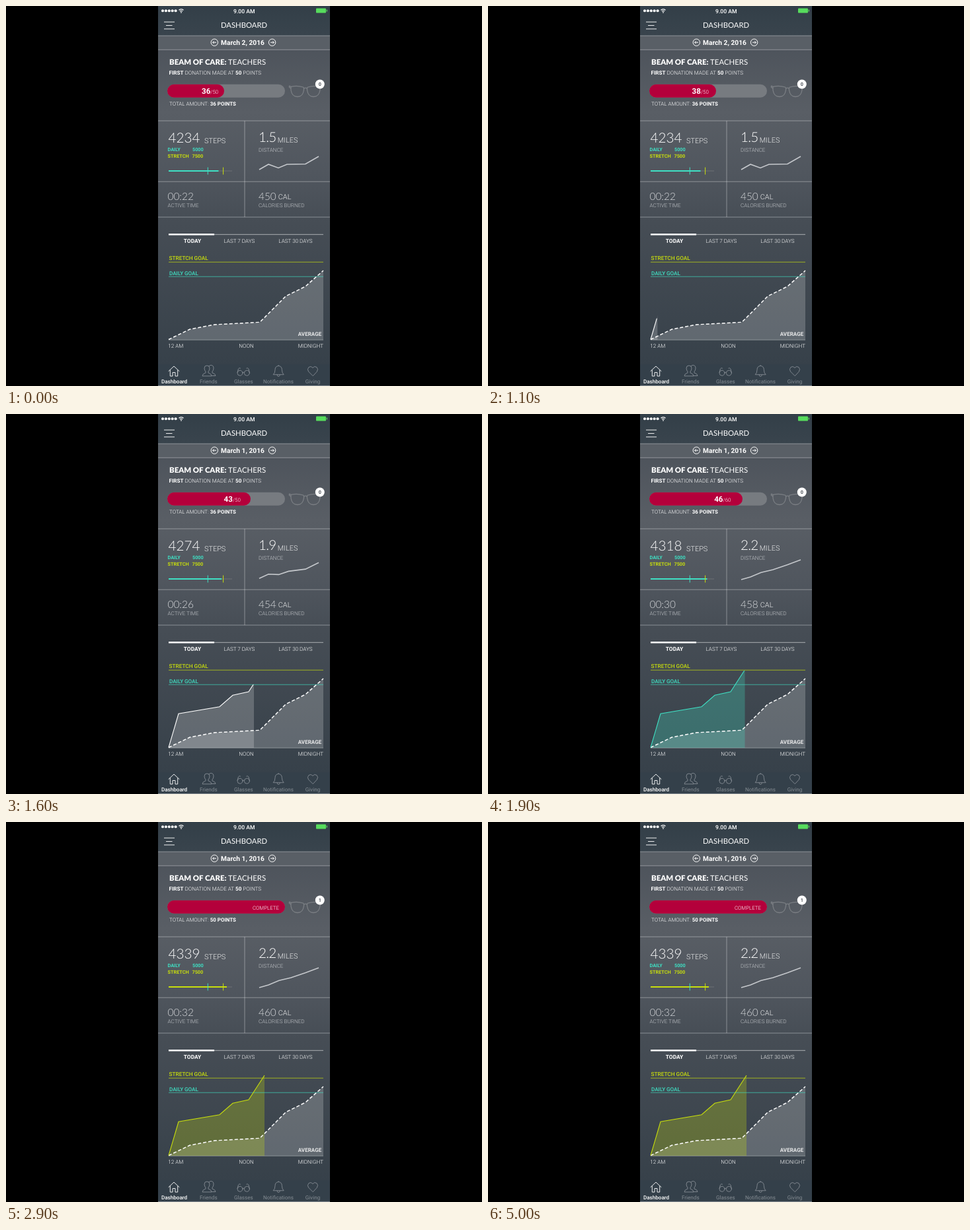
These frames come from a looping animation (720x576 px, 5.1 s). An HTML page:

```html
<!DOCTYPE html>
<html lang="en">
<head>
<meta charset="utf-8">
<title>Step dashboard</title>
<style>
  html, body { margin: 0; width: 100%; height: 100%; overflow: hidden; background: #000; }
  svg { display: block; width: 720px; height: 576px; font: 300 8.1px Roboto, sans-serif; fill: #fff; text-rendering: geometricPrecision; }
  .line { fill: none; stroke: #fff; }
  .rule { fill: none; stroke: #fff; stroke-opacity: .36; }
  .lato { font-family: Lato, sans-serif; }
  .big { font: 300 20.7px Lato, sans-serif; }
  .mid { font: 300 15.4px Lato, sans-serif; fill: #d9dbde; }
  .unit { font-size: 10.9px; fill: #eceded; }
  .dim { fill: #c3c6ca; }
  .b { font-weight: 700; }
  .m { font-weight: 500; }
  .mark { font-size: 7.3px; font-weight: 700; }
  .teal { fill: #3fe0c4; }
  .lime { fill: #c8de0c; }
  .c { text-anchor: middle; }
  .e { text-anchor: end; }
  .tab { fill: #858c93; font-weight: 400; }
  .icon { fill: none; stroke: #858c93; stroke-width: .9; stroke-linejoin: round; stroke-linecap: round; }
</style>
</head>
<body>
<svg viewBox="0 0 720 576" xmlns="http://www.w3.org/2000/svg">
  <defs>
    <linearGradient id="head" x2="0" y2="1">
      <stop stop-color="#333f48"/><stop offset="1" stop-color="#39444d"/>
    </linearGradient>
    <linearGradient id="body" gradientUnits="userSpaceOnUse" x1="0" y1="66" x2="0" y2="543">
      <stop stop-color="#4e545c"/><stop offset=".2" stop-color="#595e65"/>
      <stop offset=".4" stop-color="#50565e"/><stop offset=".55" stop-color="#464d55"/>
      <stop offset="1" stop-color="#37414a"/>
    </linearGradient>
    <clipPath id="reveal"><rect id="window" x="246" y="370" width="0" height="136"/></clipPath>
  </defs>

  <rect width="720" height="576" fill="#000"/>
  <rect x="230" width="260" height="45" fill="url(#head)"/>
  <rect x="230" y="45" width="260" height="21" fill="#595f66"/>
  <rect x="230" y="66" width="260" height="477" fill="url(#body)"/>
  <rect x="230" y="543" width="260" height="33" fill="#34404a"/>
  <path class="rule" d="M230 45h260M230 66.3h260M230 174h260M230 266.2h260M230 320h260M361 174v146M230 575.5h260"/>

  <!-- status and header -->
  <g id="dots"></g>
  <path class="line" stroke-width="1.2" d="M261.5 6.2q3.5-2.6 7 0M263 8.1q2-1.5 4 0"/>
  <circle cx="265" cy="9.8" r=".9"/>
  <text class="m" x="344" y="10.5" font-size="8.6">9.00 AM</text>
  <rect x="469" y="3.5" width="15" height="7" rx="1" fill="#57dc5d"/>
  <rect x="484.8" y="5.5" width="1.2" height="3" fill="#57dc5d"/>
  <path class="line" stroke-width=".9" d="M239 24.2h16M242 29.5h9.5M239 34.8h16"/>
  <text class="lato c" x="360" y="33.3" font-size="11.3" font-weight="400">DASHBOARD</text>
  <g class="line">
    <circle cx="315.3" cy="55.2" r="5.2"/><path d="M318 55.2h-5.4m2-2l-2 2l2 2"/>
    <circle cx="402.6" cy="55.2" r="5.2"/><path d="M400 55.2h5.4m-2-2l2 2l-2 2"/>
  </g>
  <text class="b" id="date" x="325" y="58.9" font-size="10.2"></text>

  <!-- donation -->
  <text class="lato" x="247" y="89.3" font-size="11.4" font-weight="400"><tspan font-weight="900">BEAM OF CARE:</tspan> TEACHERS</text>
  <text x="246.5" y="103.7"><tspan class="b">FIRST</tspan> DONATION MADE AT <tspan class="b">50</tspan> POINTS</text>
  <rect x="244" y="118.7" width="178" height="20" rx="10" fill="#777b80"/>
  <rect id="bar" x="244" y="118.7" height="20" rx="10" fill="#b4003b"/>
  <text id="score" y="133"><tspan id="points" class="b" font-size="11.6"></tspan><tspan id="goal" font-size="7.9"></tspan></text>
  <text id="done" class="e" x="413" y="132.8" font-size="7.9">COMPLETE</text>
  <text x="247" y="151.2" font-size="7.95">TOTAL AMOUNT: <tspan class="b" id="total"></tspan></text>
  <path class="line" style="stroke:#7b7f84" stroke-width="1.3" stroke-linejoin="round" d="M431 122.3q9.500-2.300 18.500.7q1.500 1 1 4.500q-1.500 10-9.500 10q-8.500 0-10-10zM475 122.300q-9.500-2.300-18.500.7q-1.500 1-1 4.500q1.500 10 9.500 10q8.500 0 10-10zM450.500 125q2.500-1.800 5 0M431 125l-2.500-1.800v-2l2.500 1M475 125l2.500-1.800v-2l-2.500 1"/>
  <circle cx="474.8" cy="118.500" r="7"/>
  <text class="b c" id="badge" x="474.8" y="121" font-size="7.3" style="fill:#50555c"></text>

  <!-- activity -->
  <text class="big" id="steps" x="245.5" y="206.5"></text>
  <text class="unit" x="300" y="207.6">STEPS</text>
  <text class="mark teal" x="244.5" y="220.3">DAILY</text><text class="mark teal" x="282" y="220.3">5000</text>
  <text class="mark lime" x="244.5" y="230">STRETCH</text><text class="mark lime" x="281.5" y="230">7500</text>
  <path class="line" style="stroke:#6c7075" d="M246 250h96"/>
  <path class="line" id="meter" stroke-width="1.8"/>
  <path class="line" style="stroke:#3fe0c4" d="M305.3 244.5v11"/>
  <path class="line" style="stroke:#c8de0c" d="M328.6 244.5v11"/>
  <text class="big" id="miles" x="382" y="206" letter-spacing="-.8"></text>
  <text class="unit" x="410.8" y="206.7">MILES</text>
  <text class="dim" x="382" y="220.7">DISTANCE</text>
  <polyline class="line" id="trend" stroke-width="1.6" style="stroke:#c5c8cc"/>
  <text class="mid" id="active" x="244.5" y="293.5"></text>
  <text class="dim" x="244.5" y="304.7">ACTIVE TIME</text>
  <text class="mid" id="cal" x="382" y="293.5"></text>
  <text class="unit" x="411.8" y="293.3">CAL</text>
  <text class="dim" x="382" y="304.7">CALORIES BURNED</text>

  <!-- chart -->
  <path class="rule" style="stroke-opacity:.55" d="M246 346.3h234"/>
  <rect x="246" y="345" width="69" height="2.5"/>
  <text class="b c" x="282" y="359.2" font-size="8.4">TODAY</text>
  <text x="329.5" y="358.9">LAST 7 DAYS</text>
  <text x="412.3" y="359.2">LAST 30 DAYS</text>
  <path id="avgArea" fill-opacity=".2"/>
  <path class="rule" d="M246 506.2h234"/>
  <g clip-path="url(#reveal)"><path id="area"/></g>
  <path class="line" style="stroke:#c8de0c" stroke-opacity=".7" d="M246 388.2h234"/>
  <path class="line" style="stroke:#3fe0c4" stroke-opacity=".65" d="M246 410.2h234"/>
  <text class="m lime" x="246.5" y="384.8" font-size="8.25">STRETCH GOAL</text>
  <text class="m teal" x="247" y="407.8">DAILY GOAL</text>
  <path class="line" id="avg" stroke-width="1.45" stroke-dasharray="5 3"/>
  <path class="line" id="day" stroke-width="1.1"/>
  <text class="b e" x="477.3" y="500.3" style="fill:#e8e9ea">AVERAGE</text>
  <text x="245.3" y="517.5">12 AM</text>
  <text class="c" x="363.5" y="517.5">NOON</text>
  <text class="e" x="480" y="517.5">MIDNIGHT</text>

  <!-- tabs -->
  <path class="icon" style="stroke:#fff" d="M246 553.5l8-7.500l8 7.500M248.300 552v9h3.700v-5.500h4v5.500h3.700v-9"/>
  <path class="icon" d="M297 560.5q0-3 5-4.500v-2q-2-1.500-2-5q0-4 4-4t4 4q0 3.500-2 5v2q5 1.500 5 4.500zM307 546q1-1.500 3-1.500q4 0 4 4.500q0 3.500-2 5v2q5 1.500 5 4.500h-6"/>
  <g class="icon"><circle cx="354" cy="556.3" r="4"/><circle cx="364.4" cy="556.3" r="4"/><path d="M358 555.5q1.200-1 2.400 0M350 555.500l1.500-5.500q1-2 3-1M368.400 555.500l-1.500-5.500q-1-2-3-1"/></g>
  <path class="icon" d="M404.5 558.5q2.500-2 2.500-7q0-5.500 5.200-6q5.200.5 5.200 6q0 5 2.500 7zM410 559q.3 2.500 2.200 2.500t2.200-2.500M412.200 545.500v-1"/>
  <path class="icon" d="M464 560.5l-6.500-6.500q-2.500-3.500.5-6.500q3.500-2.500 6 1q2.500-3.500 6-1q3 3 .5 6.500z"/>
  <g id="tabs"></g>
</svg>
<script>
const $ = id => document.getElementById(id);
const LOOP = 5100, STEP = 100;
const WHITE = [255, 255, 255], TEAL = [63, 224, 196], LIME = [200, 222, 12];
const avgPts = [[246, 505.5], [278, 490], [315, 483], [384, 479.3], [423, 440], [453, 425], [480, 401]];
const dayPts = [[246, 505.5], [261, 454.3], [323, 443.7], [343, 426.3], [367, 421], [391, 384]];
const trendA = [[383, 248], [397, 240], [412, 245.5], [425, 240], [453, 239.5], [473, 228]];
const trendB = [[383, 251], [397, 247], [413, 240.3], [431, 236], [453, 228.5], [473, 221]];

const mix = (a, b, p) => a + (b - a) * p;
const ramp = (t, from, to) => Math.min(1, Math.max(0, (t - from) / (to - from)));
const mixAll = (a, b, p) => a.map((v, i) => mix(v, b[i], p));
const text = (id, s) => { $(id).textContent = s; };
const show = (id, on) => $(id).setAttribute('visibility', on ? 'visible' : 'hidden');

// Linear interpolation through [time, value] keys
function track(t, keys) {
  let v = keys[0][1];
  for (let i = 1; i < keys.length; i++) {
    const [t0, v0] = keys[i - 1], [t1, v1] = keys[i];
    if (t > t0) v = mix(v0, v1, ramp(t, t0, t1));
  }
  return v;
}

function setup() {
  const close = pts => `M${pts.join('L')}V506H246Z`;
  $('avg').setAttribute('d', 'M' + avgPts.join('L'));
  $('avgArea').setAttribute('d', close(avgPts));
  $('day').setAttribute('d', 'M' + dayPts.join('L'));
  $('area').setAttribute('d', close(dayPts));
  $('dots').innerHTML = [0, 1, 2, 3, 4].map(i => `<circle cx="${237 + i * 4.9}" cy="7.3" r="2"/>`).join('');
  const tabs = [['Dashboard', 254.5], ['Friends', 306.3], ['Glasses', 359.3], ['Notifications', 412], ['Giving', 464]];
  $('tabs').innerHTML = tabs.map(([s, x], i) =>
    `<text class="c ${i ? 'tab' : 'm'}" x="${x}" y="571.7">${s}</text>`).join('');
}

function draw(t) {
  const full = t >= 2700;
  const run = ramp(t, 1330, 2045);
  const dist = ramp(t, 1300, 1850);
  const bend = ramp(t, 1400, 1900);
  const lime = ramp(t, 1900, 2100);

  text('date', `March ${t < 1300 ? 2 : 1}, 2016`);
  $('bar').setAttribute('width', Math.min(178, 86 + Math.max(0, t - 800) * .05));
  $('score').setAttribute('x', 296 + Math.max(0, t - 800) * .042);
  text('points', Math.round(track(t, [[800, 36], [1100, 38], [1900, 46], [2400, 60], [2700, 69]])));
  text('goal', '/' + (t < 1900 ? 50 : t < 2200 ? 60 : 70));
  show('score', !full);
  show('done', full);
  text('total', (full ? 50 : 36) + ' POINTS');
  text('badge', full ? 1 : 0);

  text('steps', Math.round(4234 + 105 * run));
  text('miles', (1.5 + .7 * dist).toFixed(1));
  text('active', '00:' + Math.round(22 + 10 * run));
  text('cal', Math.round(450 + 10 * run));
  $('trend').setAttribute('points', trendA.map((p, i) => mixAll(p, trendB[i], bend)).join(' '));
  $('meter').setAttribute('d', `M246 250H${mix(321.5, 334, run)}`);
  $('meter').style.stroke = `rgb(${mixAll(TEAL, LIME, lime)})`;

  const day = $('day'), len = day.getTotalLength();
  const s = len * track(t, [[900, 0], [1100, .157], [1200, .32], [1500, .755], [1600, .852], [1900, .97], [2100, 1]]);
  const ink = `rgb(${mixAll(mixAll(WHITE, TEAL, ramp(t, 1600, 1800)), LIME, lime)})`;
  day.style.stroke = ink;
  day.setAttribute('stroke-dasharray', `${s} ${len * 2}`);
  show('day', s > 0);
  $('area').style.fill = ink;
  $('area').setAttribute('fill-opacity', mix(.2, .27, ramp(t, 1600, 1800)));
  $('window').setAttribute('width', s ? day.getPointAtLength(s).x - 245 : 0);
}

function tick() {
  const t = performance.now() % LOOP;
  draw(Math.floor(t / STEP) * STEP);
  requestAnimationFrame(tick);
}
setup();
tick();
</script>
</body>
</html>
```
